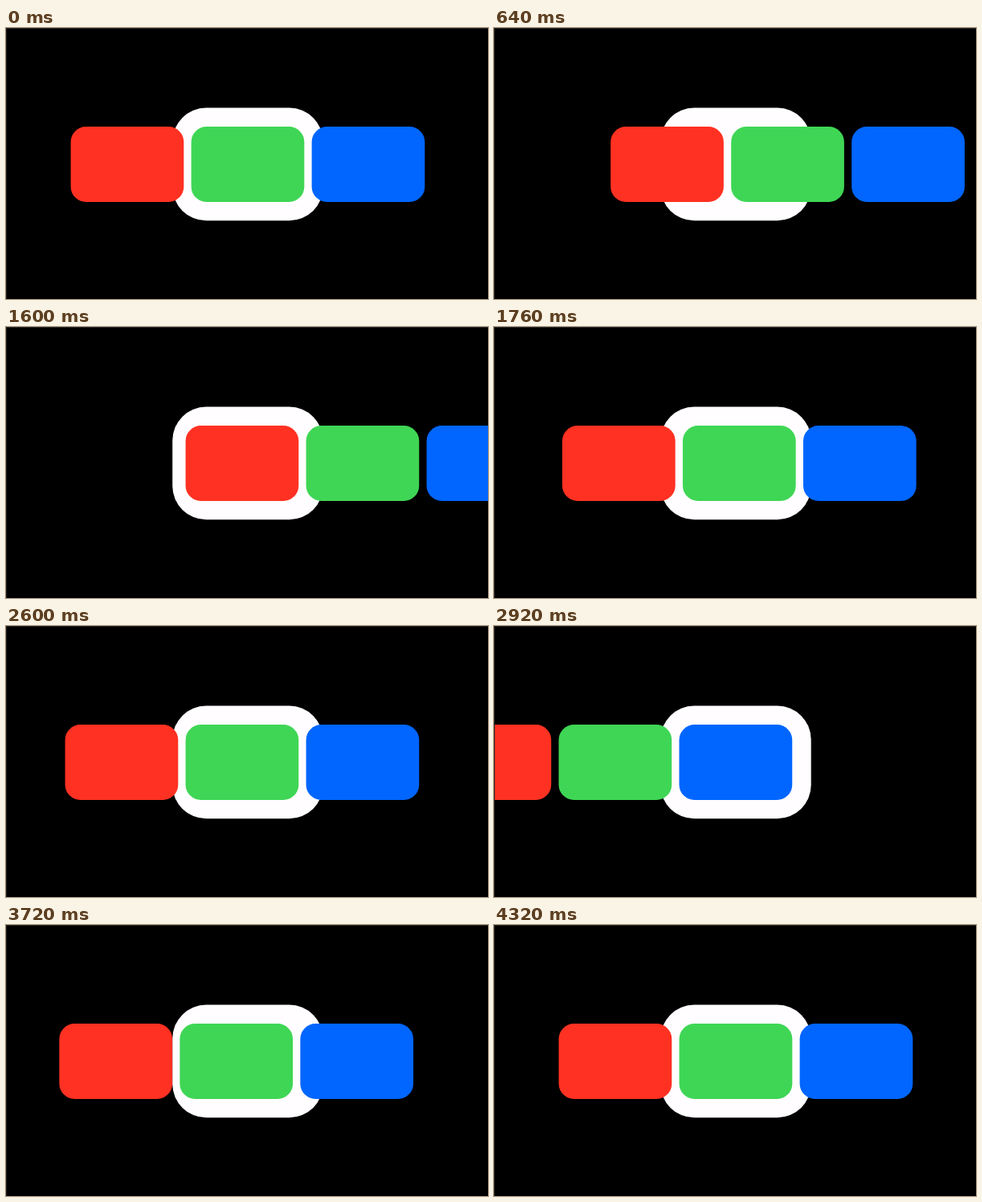
Recreate the animation shown at these times as an HTML page. Size 600 by 338 pixels, loop 4.52 s.

```html
<!DOCTYPE html>
<html lang="en">
<head>
<meta charset="utf-8">
<title>Card carousel</title>
<style>
  html, body { margin: 0; width: 100%; height: 100%; overflow: hidden; background: #000; }
  svg { display: block; width: 100%; height: 100%; }
</style>
</head>
<body>
<svg viewBox="0 0 600 338">
  <rect x="207.2" y="99.6" width="187.5" height="140.7" rx="42" fill="#fffdff"/>
  <g id="cards">
    <rect x="80.6" y="123.1" width="140.7" height="93.8" rx="19" fill="#ff3122"/>
    <rect x="230.6" y="123.1" width="140.7" height="93.8" rx="19" fill="#3fd655"/>
    <rect x="380.6" y="123.1" width="140.7" height="93.8" rx="19" fill="#0066ff"/>
  </g>
  <path d="M0 338V0H600V1H1V338Z" fill="#222"/>
</svg>
<script>
  const LOOP = 4520, STEP = 40, SPACING = 150;
  const FIRST_MOVE = 587.3, INTERVAL = 1000;
  const DIRECTIONS = [1, -1, -1, 1];
  const DAMPING = 0.92, FREQUENCY = 0.02675;
  const cards = document.getElementById('cards');

  // Step response of a slightly underdamped spring, t in ms
  function spring(t) {
    if (t <= 0) return 0;
    const root = Math.sqrt(1 - DAMPING ** 2);
    const angle = FREQUENCY * root * t;
    return 1 - Math.exp(-DAMPING * FREQUENCY * t) *
      (Math.cos(angle) + DAMPING / root * Math.sin(angle));
  }

  function draw(now) {
    const t = Math.floor(now % LOOP / STEP) * STEP;
    const offset = DIRECTIONS.reduce((sum, direction, i) =>
      sum + direction * spring(t - FIRST_MOVE - i * INTERVAL), 0);
    cards.setAttribute('transform', `translate(${(offset * SPACING).toFixed(2)} 0)`);
  }

  const start = performance.now();
  function tick() {
    draw(performance.now() - start);
    requestAnimationFrame(tick);
  }
  tick();
</script>
</body>
</html>
```
